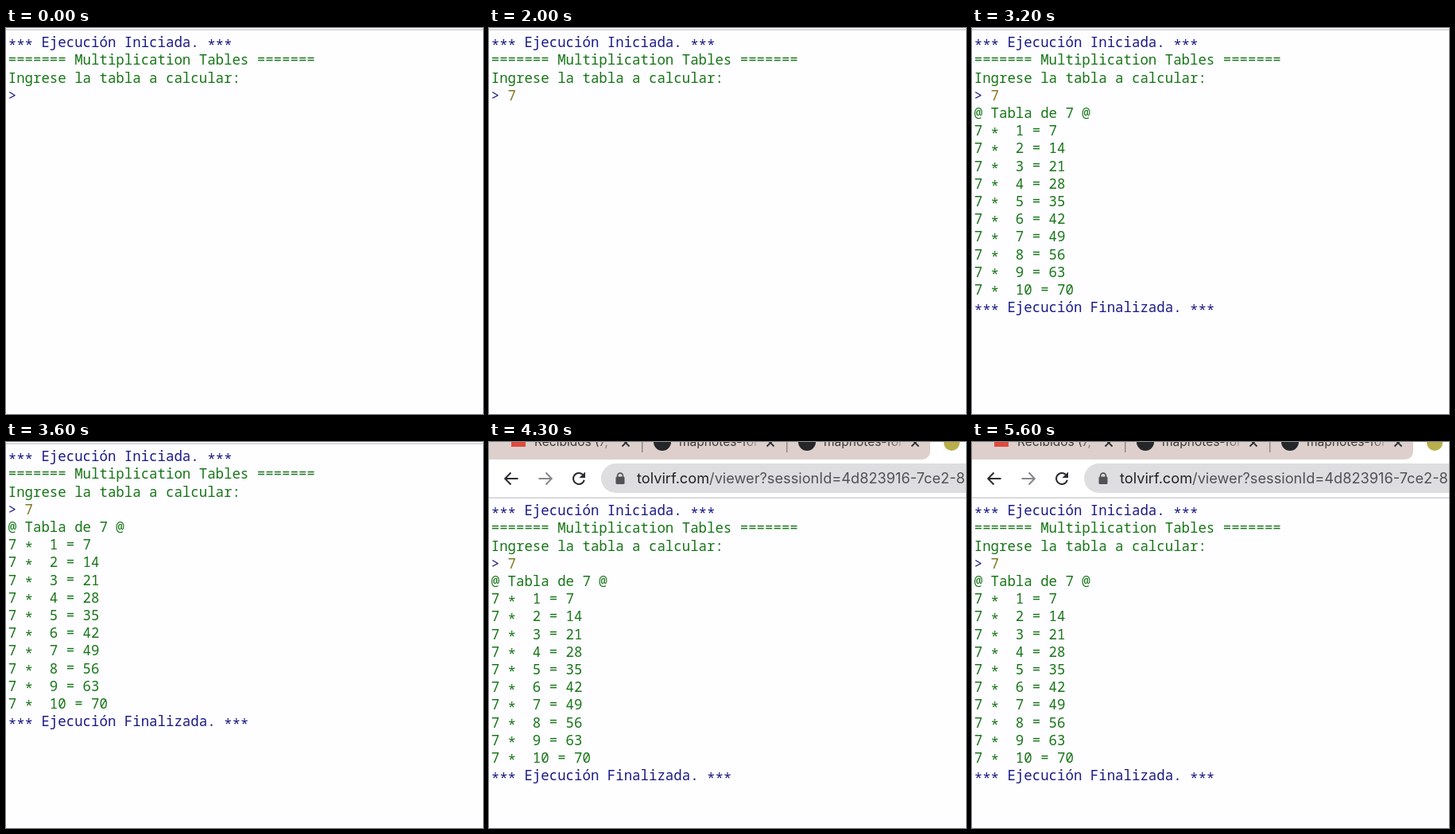
Recreate the animation shown at these times as an HTML page with a canvas. Size 600 by 485 pixels, loop 5.7 s.

```html
<!DOCTYPE html>
<html lang="es">
<head>
<meta charset="utf-8">
<title>Tabla de multiplicar</title>
<style>
  html, body { margin: 0; width: 100%; height: 100%; overflow: hidden; background: #fefdff; }
  canvas { display: block; width: 600px; height: 485px; }
</style>
</head>
<body>
<canvas id="stage" width="600" height="485"></canvas>
<script>
const ctx = document.getElementById('stage').getContext('2d');
const W = 600, H = 485, LOOP = 5700;
const TYPED = 1000, RESULT = 2680, BAR_IN = 4280, BAR = 68;
const NAVY = '#1b1b86', GREEN = '#177617', OLIVE = '#7f771f';
const PAPER = '#fefdff', STRIP = '#ddd0cc', INK = '#2b2c30', GREY = '#85878b';
const MONO = '500 17.4px "Noto Sans Mono", "DejaVu Sans Mono", monospace';
const SANS = 'Inter, Roboto, sans-serif';
const LEFT = 2.7, BASE = 24.2, LEADING = 22.2;

// Vertical nudges for signs the font sets too high or too low.
const NUDGE = { '*': 3.3, '=': -1.2 };

function text(str, x, y, color, font) {
  ctx.font = font;
  ctx.fillStyle = color;
  ctx.fillText(str, x, y);
}

function row(n, str, color, col = 0) {
  ctx.font = MONO;
  const step = ctx.measureText('0').width;
  const x = LEFT + col * step, y = BASE + n * LEADING;
  text(str.replace(/[*=]/g, ' '), x, y, color, MONO);
  [...str].forEach((ch, i) => {
    if (ch in NUDGE) text(ch, x + i * step, y + NUDGE[ch], color, MONO);
  });
}

function stroke(color, width, path) {
  ctx.strokeStyle = color;
  ctx.lineWidth = width;
  ctx.beginPath();
  path();
  ctx.stroke();
}

function line(color, width, ...pts) {
  stroke(color, width, () => {
    for (let i = 0; i < pts.length; i += 2) ctx.lineTo(pts[i], pts[i + 1]);
  });
}

function disc(x, y, r, color) {
  ctx.fillStyle = color;
  ctx.beginPath();
  ctx.arc(x, y, r, 0, Math.PI * 2);
  ctx.fill();
}

function terminal(t) {
  ctx.fillStyle = PAPER;
  ctx.fillRect(0, 0, W, H);
  ctx.fillStyle = '#c3c2c5';
  ctx.fillRect(0, 1.5, W, 1.2);
  row(0, '*** Ejecución Iniciada. ***', NAVY);
  row(1, '======= Multiplication Tables =======', GREEN);
  row(2, 'Ingrese la tabla a calcular:', GREEN);
  row(3, '>', NAVY);
  if (t >= TYPED) row(3, '7', OLIVE, 2);
  if (t < RESULT) return;
  row(4, '@ Tabla de 7 @', GREEN);
  for (let i = 1; i <= 10; i++) row(4 + i, `7 *  ${i} = ${7 * i}`, GREEN);
  row(15, '*** Ejecución Finalizada. ***', NAVY);
}

function tabTitle(str, x, end) {
  const fade = ctx.createLinearGradient(end - 24, 0, end, 0);
  fade.addColorStop(0, '#3d3a39');
  fade.addColorStop(1, 'rgba(61,58,57,0)');
  text(str, x, 5, fade, '15.5px ' + SANS);
}

function cross(x, y) {
  line(INK, 1.8, x - 4.5, y - 4.5, x + 4.5, y + 4.5);
  line(INK, 1.8, x + 4.5, y - 4.5, x - 4.5, y + 4.5);
}

function arrow(x, y, dir, color) {
  line(color, 2, x - 8 * dir, y, x + 8 * dir, y);
  line(color, 2, x + dir, y - 7.5, x + 8.3 * dir, y, x + dir, y + 7.5);
}

function reload(x, y) {
  stroke(INK, 2.1, () => ctx.arc(x, y, 7, 0.25, 5.5));
  ctx.fillStyle = INK;
  ctx.beginPath();
  ctx.moveTo(x + 8, y - 8.5);
  ctx.lineTo(x + 8, y - 1);
  ctx.lineTo(x + 0.5, y - 1);
  ctx.fill();
}

function padlock(x, y) {
  stroke('#505256', 1.7, () => {
    ctx.moveTo(x - 3.4, y - 2);
    ctx.arc(x, y - 4, 3.4, Math.PI, 0);
    ctx.lineTo(x + 3.4, y - 2);
  });
  ctx.fillStyle = '#505256';
  ctx.beginPath();
  ctx.roundRect(x - 5.5, y - 3, 11, 9.5, 1.5);
  ctx.fill();
}

function browserBar() {
  ctx.fillStyle = '#fff';
  ctx.fillRect(0, 0, W, BAR);
  ctx.fillStyle = STRIP;
  ctx.beginPath();
  ctx.roundRect(-20, -20, 575, 42, [0, 0, 10, 0]);
  ctx.fill();

  ctx.fillStyle = '#e04a3c';
  ctx.fillRect(28, -11, 18, 17);
  tabTitle('Recibidos (7,', 57, 160);
  for (const x of [207, 389]) {
    disc(x + 11, 0, 11, '#24262a');
    tabTitle('mapnotes-fol', x + 32, x + 136);
    ctx.fillStyle = '#8d8482';
    ctx.fillRect(x - 15, -12, 1.4, 25);
  }
  for (const x of [172, 354, 536]) cross(x, 1);
  disc(582, 1, 10, '#b9ae4c');

  arrow(28.5, 46, -1, INK);
  arrow(70.5, 46, 1, GREY);
  reload(113, 46);
  ctx.fillStyle = '#dedde0';
  ctx.beginPath();
  ctx.roundRect(141, 27, 520, 37, 18.5);
  ctx.fill();
  padlock(165, 46.5);

  const font = '18.2px ' + SANS, host = 'tolvirf.com';
  text(host, 186, 52, '#202125', font);
  text('/viewer?sessionId=4d823916-7ce2-8', 186 + ctx.measureText(host).width, 52, '#505257', font);
}

function draw(t) {
  const open = t >= BAR_IN;
  ctx.setTransform(1, 0, 0, 1, 0, 0);
  if (open) browserBar();
  ctx.translate(0, open ? BAR : 0);
  terminal(t);
}

const start = performance.now();
function tick() {
  draw((performance.now() - start) % LOOP);
  requestAnimationFrame(tick);
}
tick();
</script>
</body>
</html>
```
